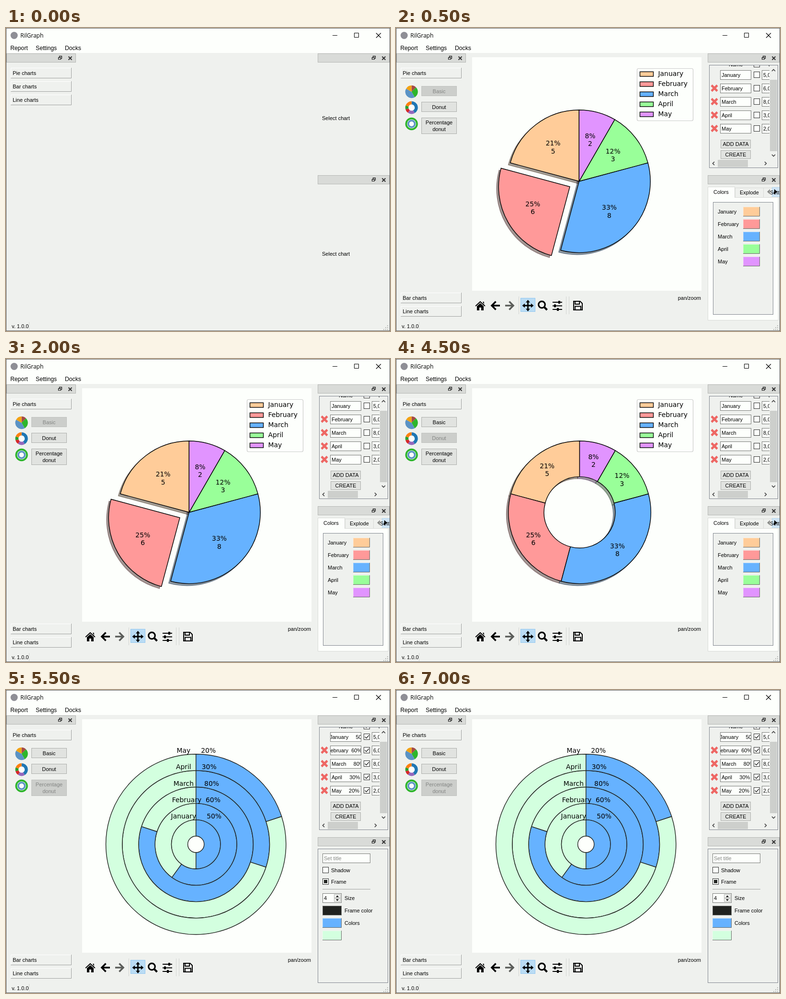
Animation, 802 px wide and 632 px high, one loop 8000 ms. Source, as an HTML page:

```html
<!DOCTYPE html>
<html lang="en">
<head>
<meta charset="utf-8">
<title>Chart window</title>
<style>
  html, body { margin: 0; width: 100%; height: 100%; overflow: hidden; }
  svg { display: block; width: 802px; height: 632px; }
  text { white-space: pre; }
</style>
</head>
<body>
<svg id="stage" viewBox="0 0 802 632"></svg>
<script>
const WHITE = '#fdfffc', PANEL = '#eff1ee', FRAME = '#828790', INK = '#20221f', BLUE = '#66b2ff', MINT = '#d3ffdf';
const UI = "'Liberation Sans',Arial,sans-serif", PLOT = "'DejaVu Sans',sans-serif";
const LOOP = 8000, SCENE_STARTS = [0, 500, 3000, 5500];

// name, value, percent, colour
const months = [
  ['January', 5, 50, '#ffcc99'],
  ['February', 6, 60, '#ff9999'],
  ['March', 8, 80, BLUE],
  ['April', 3, 30, '#99ff99'],
  ['May', 2, 20, '#e194ff'],
];
const percentLabel = ([name, , percent]) => name + ' '.repeat(name === 'February' ? 2 : 5) + percent + '%';

// Drawing helpers; boxes are given by their outer pixel edges
const text = (x, y, s, { size = 11, fill = '#000', anchor = 'start', font = UI } = {}) =>
  `<text x="${x}" y="${y}" font-size="${size}" fill="${fill}" text-anchor="${anchor}" font-family="${font}">${s}</text>`;
const plotText = (x, y, s, anchor = 'middle') => text(x, y, s, { size: 13.89, font: PLOT, anchor });
const fillBox = (x, y, w, h, fill) => `<rect x="${x}" y="${y}" width="${w}" height="${h}" fill="${fill}"/>`;
const box = (x, y, w, h, fill, stroke) =>
  `<rect x="${x + .5}" y="${y + .5}" width="${w - 1}" height="${h - 1}" fill="${fill}" stroke="${stroke}"/>`;
const line = (d, stroke = '#000', width = 1) => `<path d="${d}" fill="none" stroke="${stroke}" stroke-width="${width}"/>`;
const shape = (d, fill = '#000') => `<path d="${d}" fill="${fill}"/>`;
const circle = (x, y, r, fill) => `<circle cx="${x}" cy="${y}" r="${r}" fill="${fill}"/>`;
const clip = (id, s) => `<g clip-path="url(#${id})">${s}</g>`;
const raised = (x, y, w, h, light = '#fff', dark = '#a0a2a0') =>
  line(`M${x + .5} ${y + h}V${y + .5}H${x + w}`, light) + line(`M${x} ${y + h - .5}H${x + w - .5}V${y}`, dark);
const swatch = (x, y, w, fill) => fillBox(x, y, w, 20, fill) + raised(x, y, w, 20, 'rgba(255,255,255,.4)', '#696b68');
const toolBoxTab = (y, s) => raised(10, y, 127, 22) + text(14, y + 15, s);

function button(x, y, w, h, lines, disabled) {
  const first = y + h / 2 + 4 - (lines.length - 1) * 7;
  return box(x, y, w, h, disabled ? '#cccecb' : '#e1e3e0', disabled ? '#bfc1be' : '#adafac') +
    lines.map((s, i) => text(x + w / 2, first + i * 14, s, { anchor: 'middle', fill: disabled ? '#838583' : '#000' })).join('');
}

function checkBox(x, y, state) {
  return box(x, y, 13, 13, WHITE, '#333') +
    (state === 'on' ? line(`M${x + 2.5} ${y + 6.5}l3 3 5.5-6`, '#222', 1.3) : '') +
    (state === 'partial' ? fillBox(x + 3, y + 3, 7, 7, INK) : '');
}

const dockBar = (x, y, w) => {
  const r = x + w;
  return box(x, y, w, 19, '#d9dbd8', '#b6b8b5') +
    line(`M${r - 34.5} ${y + 8}v-2.5h5v5h-2M${r - 34.5} ${y + 6}h5M${r - 36.5} ${y + 8.5}h5v4h-5zM${r - 37} ${y + 9}h6`, '#222', 1.2) +
    line(`M${r - 15.5} ${y + 6.5}l7 7m0-7l-7 7`, '#333', 2);
};

// Angles run clockwise from twelve o'clock
const polar = (x, y, r, deg) => {
  const a = deg * Math.PI / 180;
  return [x + r * Math.sin(a), y - r * Math.cos(a)];
};
function wedge(x, y, inner, outer, from, to, style) {
  const at = (r, a) => polar(x, y, r, a).map(v => v.toFixed(2)).join(' ');
  const large = +(to - from > 180);
  return `<path d="M${at(outer, from)}A${outer} ${outer} 0 ${large} 1 ${at(outer, to)}` +
    `L${at(inner, to)}A${inner} ${inner} 0 ${large} 0 ${at(inner, from)}Z" style="${style}"/>`;
}

function pieChart(cx, cy, inner, labelAt, explode) {
  const R = 148.8, shift = 4.13;
  let end = 0, shadows = '', slices = '', labels = '';
  for (const [name, value, , color] of months) {
    const start = end - value * 15, mid = (start + end) / 2;
    const out = name === 'February' ? explode * R : 0;
    const [x, y] = polar(cx, cy, out, mid);
    const [lx, ly] = polar(cx, cy, labelAt * R + out, mid);
    const dark = `color-mix(in srgb,${color} 30%,#000)`;
    shadows += wedge(x - shift, y + shift, inner, R, start, end, `fill:${dark};stroke:${dark};stroke-width:1.4;fill-opacity:.5;stroke-opacity:.5`);
    slices += wedge(x, y, inner, R, start, end, `fill:${color};stroke:#000;stroke-width:1.4`);
    labels += plotText(lx, ly - 3.5, Math.round(value / .24 - .01) + '%') + plotText(lx, ly + 12.7, value);
    end = start;
  }
  const legend = `<rect x="503.5" y="84.5" width="117" height="109" rx="3" fill="${WHITE}" stroke="#ccc" stroke-width="1.2"/>` +
    months.map(([name, , , color], i) =>
      `<rect x="509.5" y="${91.3 + i * 21}" width="28" height="9.6" fill="${color}" stroke="#000" stroke-width="1.4"/>` +
      plotText(547.5, 100.3 + i * 21, name, 'start')).join('');
  return shadows + slices + labels + legend;
}

function ringChart() {
  const cx = 396.7, cy = 321.9, step = 34.2;
  const edge = `stroke:${INK};stroke-width:1.4`;
  return months.map(([, , percent], i) => {
    const inner = step * (i + .5), cut = percent * 3.6;
    return wedge(cx, cy, inner, inner + step, cut, 360, `fill:${MINT};${edge}`) +
      wedge(cx, cy, inner, inner + step, 0, cut, `fill:${BLUE};${edge}`);
  }).join('') + months.map((m, i) => plotText(cx + .6, 268 - i * step, percentLabel(m))).join('');
}

function chartPicker(active) {
  const pie = [[0, 45, '#a34a48'], [45, 150, '#2db52b'], [150, 300, '#5b93c5'], [300, 360, '#f2a212']];
  const donut = [[0, 150, '#1f77b4'], [150, 215, '#9467bd'], [215, 255, '#d62728'], [255, 290, '#2ca02c'], [290, 360, '#ff7f0e']];
  const icon = (y, inner, parts) => parts.map(([a, b, c]) => wedge(32.5, y, inner, 13.2, a, b, 'fill:' + c)).join('');
  return toolBoxTab(83, 'Pie charts') + toolBoxTab(552, 'Bar charts') + toolBoxTab(580, 'Line charts') +
    icon(133, 0, pie) + circle(32.5, 166, 8, WHITE) + icon(166, 6.5, donut) +
    circle(32.5, 200, 13.2, '#2db52b') + circle(32.5, 200, 9.5, '#dfe8df') + circle(32.5, 200, 8.5, '#5b93c5') + circle(32.5, 200, 5, WHITE) +
    button(53, 121, 74, 21, ['Basic'], active === 0) +
    button(53, 154, 74, 21, ['Donut'], active === 1) +
    button(53, 187, 74, 34, ['Percentage', 'donut'], active === 2);
}

function toolbar() {
  const heads = [0, 90, 180, 270].map(a => `<path d="M275.5 567l4.5 5.5h-9z" transform="rotate(${a} 275.5 579)"/>`).join('');
  const slider = (y, knob) => line(`M327 ${y}h20`, '#000', 2) + fillBox(knob, y - 3, 4, 6, '#000');
  return line('M256.5 560v37M355.5 560v37M361.5 560v37', '#d3d5d2') +
    shape('M176 569.5l10.5 9.7-1.3 1.5-9.2-8.4-9.2 8.4-1.3-1.5zM181 571h2.8v5.5zM176 574l7 6.3v8.7h-5v-6h-4v6h-5v-8.7z') +
    line('M217 579h-16M208.5 570.5l-8.5 8.5 8.5 8.5', '#000', 3.6) +
    line('M228 579h16M236.5 570.5l8.5 8.5-8.5 8.5', '#5b5d5a', 3.6) +
    box(260, 563, 31, 29, '#badcf4', '#93c8f1') + line('M275.5 570v18M266.5 579h18', '#000', 2.8) + heads +
    `<circle cx="304.5" cy="577" r="6.8" fill="none" stroke="#000" stroke-width="3.2"/>` + line('M309.5 582l6 6', '#000', 4) +
    slider(572, 339) + slider(579.5, 330) + slider(587, 336) +
    line('M371 570h13.5l4.5 4.5v13.5h-18zM374 570v6h9v-6M374 588v-7.5h12v7.5', '#000', 2) +
    text(637, 567, 'pan/zoom', { anchor: 'end' });
}

function dataTable(withPercent) {
  const tick = withPercent ? 'on' : '';
  let rows = text(695, 80, 'Name') + checkBox(747, 69, tick) + text(776, 80, 'Value');
  months.forEach((m, i) => {
    const y = 88 + i * 28;
    const start = withPercent ? [676, 671][i] ?? 680 : 680;
    rows += box(677, y, 65, 20, WHITE, '#7a7c79') +
      clip('nameField', text(start, y + 14, withPercent ? percentLabel(m) : m[0])) +
      checkBox(747, y + 3, tick) + box(764, y, 40, 20, WHITE, '#7a7c79') + text(767, y + 14, m[1] + ',0') +
      (i ? line(`M659 ${y + 31 - 28 + 28 - 28}l12 12m0-12l-12 12`.replace(/M659 \S+l/, `M659 ${y + 3}.5l`), '#ee6764', 4.6) : '');
  });
  return box(654, 77, 144, 215, PANEL, FRAME) +
    clip('table', rows + button(678, 233, 63, 18, ['ADD DATA']) + button(678, 255, 63, 18, ['CREATE'])) +
    fillBox(781, 108, 15, 149, '#cdcfcc') + fillBox(672, 275, 63, 15, '#cdcfcc') +
    line('M785 90l3.5-3.5 3.5 3.5M785 264l3.5 3.5 3.5-3.5M665 279l-3.5 3.5 3.5 3.5M770 279l3.5 3.5-3.5 3.5', '#444', 1.7);
}

function colorTabs() {
  const edge = '#d9dbd8';
  return box(651, 353, 148, 257, WHITE, edge) +
    box(708, 333, 60, 21, PANEL, edge) + box(767, 333, 40, 21, PANEL, edge) +
    box(651, 331, 57, 23, WHITE, edge) + fillBox(652, 352, 55, 3, WHITE) +
    text(663, 346, 'Colors') + text(718, 347, 'Explode') +
    box(785, 332, 17, 20, '#cfe4f5', '#b5d7ef') + text(781, 347, 'Setti') +
    shape('M781 336v11l-6-5.5z', '#8c8e8b') + shape('M790 336v11l6-5.5z') +
    box(662, 363, 126, 235, PANEL, FRAME) +
    months.map(([name, , , color], i) => text(672, 387 + i * 26, name) + swatch(725, 373 + i * 26, 35, color)).join('');
}

function ringSettings() {
  return box(651, 331, 147, 280, PANEL, FRAME) +
    box(661, 341, 100, 20, WHITE, '#7a7c79') + text(664, 355, 'Set title', { fill: '#858784' }) +
    checkBox(661, 369) + text(679, 380, 'Shadow') +
    checkBox(661, 393, 'partial') + text(679, 404, 'Frame') +
    line('M661 415.5h100', '#a0a2a0') +
    box(661, 424, 40, 20, WHITE, '#7a7c79') + text(664, 438, 4) +
    box(685, 426, 14, 8, PANEL, '#b8bab7') + box(685, 434, 14, 8, PANEL, '#b8bab7') +
    shape('M689 432l3-3.5 3 3.5zM689 436.500l3 3.5 3-3.5z') + text(707, 438, 'Size') +
    swatch(661, 450, 40, INK) + text(707, 464, 'Frame color') +
    swatch(661, 476, 40, BLUE) + text(707, 490, 'Colors') + swatch(661, 502, 40, MINT);
}

function windowFrame() {
  const grip = [[797, 621], [793, 625], [797, 625], [789, 629], [793, 629], [797, 629]];
  return `<defs><clipPath id="table">${fillBox(655, 78, 125, 196, '#000')}</clipPath>` +
    `<clipPath id="nameField">${fillBox(678, 80, 63, 150, '#000')}</clipPath></defs>` +
    fillBox(0, 0, 802, 632, PANEL) + fillBox(0, 0, 802, 52, WHITE) +
    circle(17, 15.5, 7.5, '#8f8f96') +
    text(30, 20, 'RilGraph', { size: 12, font: "'Open Sans',sans-serif" }) +
    line('M682 15.5h10M727.5 10.5h9v9h-9z') + line('M773 10.5l10 10m0-10l-10 10', '#000', 1.1) +
    ['Report', 'Settings', 'Docks'].map((s, i) => text([9, 62, 123][i], 46, s, { size: 12.2 })).join('') +
    dockBar(1, 53, 145) + dockBar(651, 53, 150) + dockBar(651, 307, 150) +
    text(12, 626, 'v. 1.0.0') + line('M48.5 613v17', '#d5d7d4') +
    grip.map(([x, y]) => fillBox(x - 1, y - 1, 2, 2, '#b9bbb8')).join('');
}

const workspace = (active, chart, settings) =>
  chartPicker(active) + fillBox(159, 61, 479, 487, WHITE) + chart + toolbar() + dataTable(active === 2) + settings;

const scenes = [
  ['Pie charts', 'Bar charts', 'Line charts'].map((s, i) => toolBoxTab(83 + i * 28, s)).join('') +
    text(660, 192, 'Select chart') + text(660, 475, 'Select chart'),
  workspace(0, pieChart(382.4, 319.8, 0, .6, .15), colorTabs()),
  workspace(1, pieChart(383.5, 319.8, 74.4, .75, 0), colorTabs()),
  workspace(2, ringChart(), ringSettings()),
];

const stage = document.getElementById('stage');
stage.innerHTML = windowFrame() + scenes.map(s => `<g class="scene" display="none">${s}</g>`).join('') +
  box(0, 0, 802, 632, 'none', '#606264');
const groups = stage.querySelectorAll('.scene');
const began = performance.now();

function draw() {
  const t = (performance.now() - began) % LOOP;
  const current = SCENE_STARTS.findLastIndex(start => t >= start);
  groups.forEach((g, i) => g.setAttribute('display', i === current ? 'inline' : 'none'));
  requestAnimationFrame(draw);
}
draw();
</script>
</body>
</html>
```
